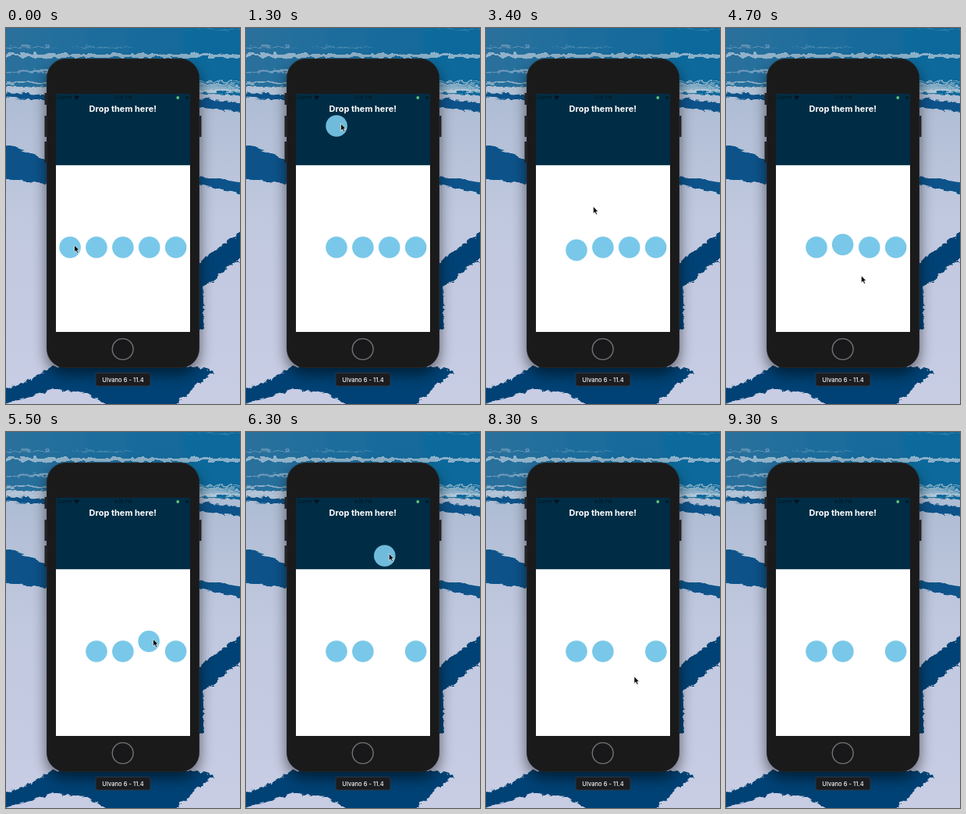
Animation, 300 px wide and 480 px high, one loop 9400 ms. Source, as an HTML page:

```html
<!DOCTYPE html>
<html lang="en">
<head>
<meta charset="utf-8">
<title>Drag and drop</title>
<style>
  html, body { margin: 0; width: 100%; height: 100%; overflow: hidden; background: #bcc5dd; }
  svg { display: block; width: 300px; height: 480px; }
  text { font-family: Inter, "Open Sans", sans-serif; }
  .status { font-size: 5.6px; fill: #02131e; }
  .title { font-size: 11px; font-weight: 700; fill: #fff; }
  .label { font-size: 7.6px; font-weight: 500; fill: #f4f4f4; }
</style>
</head>
<body>
<svg viewBox="0 0 300 480">
  <defs>
    <linearGradient id="sea">
      <stop offset="0" stop-color="#2c709d"/>
      <stop offset="1" stop-color="#08689b"/>
    </linearGradient>
    <linearGradient id="ice" x2="0" y2="1">
      <stop offset=".2" stop-color="#afbdd4"/>
      <stop offset=".5" stop-color="#c0c8df"/>
      <stop offset="1" stop-color="#c8cde4"/>
    </linearGradient>
    <filter id="rough" x="-5%" y="-5%" width="110%" height="110%">
      <feTurbulence baseFrequency=".06 .12" numOctaves="2" seed="4"/>
      <feDisplacementMap in="SourceGraphic" scale="7" xChannelSelector="R" yChannelSelector="G"/>
    </filter>
    <filter id="blur" x="-30%" y="-30%" width="160%" height="160%"><feGaussianBlur stdDeviation="9"/></filter>
  </defs>

  <rect width="300" height="480" fill="url(#ice)"/>
  <g filter="url(#rough)">
    <path d="M-9-9H309V84L-9 72Z" fill="url(#sea)"/>
    <g id="streaks" fill="#b4c8d8"></g>
    <g fill="#07528a">
      <path d="M-9 80 62 84V91L-9 87ZM240 88 309 94V106L240 99Z"/>
      <path d="M-9 146 25 156 60 172V198L-9 190Z"/>
      <path d="M240 186 309 197V212L240 196Z"/>
    </g>
    <g fill="#024274">
      <path d="M309 253 275 275 240 302V385L253 382 250 328 265 320 282 303 309 288Z"/>
      <path d="M-9 462 30 446 60 430H240L264 437 235 462 205 489H145L100 463 60 460-9 478Z"/>
    </g>
  </g>

  <rect x="52" y="48" width="196" height="394" rx="26" fill="#000" opacity=".55" filter="url(#blur)"/>
  <path d="M51 83V98M51 112V139M51 145V172M249 112V139" stroke="#202124" stroke-width="3"/>
  <rect x="52.5" y="39.5" width="195" height="394" rx="24" fill="#1a1a1b" stroke="#242527"/>
  <circle cx="149.7" cy="410" r="13.4" fill="#18181a" stroke="#737476" stroke-width="1.4"/>

  <rect x="64" y="84" width="172" height="304" fill="#fff"/>
  <rect x="64" y="84" width="172" height="91.2" fill="#002d45"/>
  <g class="status">
    <text x="66.5" y="91">Carrier</text>
    <text x="150" y="91" text-anchor="middle">4:06 PM</text>
    <path d="M87 87.6Q90.5 84.8 94 87.6L90.5 92Z"/>
    <rect x="230.5" y="87.5" width="3" height="3" rx=".8"/>
  </g>
  <circle cx="220.3" cy="89" r="1.9" fill="#5fc07a"/>
  <text class="title" x="149.7" y="106.5" text-anchor="middle">Drop them here!</text>

  <rect x="115" y="440.5" width="70" height="16.5" rx="2.5" fill="#1b1c20" stroke="#3a3c42" stroke-width=".7"/>
  <text class="label" x="150" y="451.8" text-anchor="middle">Ulvano 6 - 11.4</text>

  <g id="balls" fill="#79c8e9"></g>
  <path id="cursor" d="M0 0V9.2L2.1 7.3 3.6 10.6 5.2 9.9 3.8 6.7H6.5Z" fill="#050505" stroke="#fff" stroke-width=".7"/>
</svg>

<script>
const LOOP = 9400, STEP = 100, TRAVEL = 750, REST = 300, FADE = 1000;

// dx, dy: how far each ball is carried; hold: pointer offset from its centre
const drags = [
  { grab: 350, release: 1100, dx: 34, dy: -155, drop: true },
  { grab: 2350, release: 3040, dx: 0, dy: -93 },
  { grab: 3860, release: 4350, dx: 5, dy: 71 },
  { grab: 5350, release: 6100, dx: -6, dy: -122, drop: true },
  { grab: 7000, release: 7500, dx: -133.5, dy: -72, hold: [1, 5] }
];
const home = i => [82.1 + i * 33.9, 280];

const easeInOut = p => p < .5 ? 2 * p * p : 1 - 2 * (1 - p) ** 2;
const progress = (t, from, to) => Math.min(1, Math.max(0, (t - from) / (to - from)));
const glide = (t, from, to) => {
  const p = progress(t, from, to);
  return p * p * (3 - 2 * p);
};

// Damped spring from 1 to 0
function spring(ms) {
  const s = ms / 1000, w = 12.9;
  return Math.exp(-8 * s) * (Math.cos(w * s) + 8 / w * Math.sin(w * s));
}

function add(parent, tag, attrs) {
  const el = document.createElementNS('http://www.w3.org/2000/svg', tag);
  for (const name in attrs) el.setAttribute(name, attrs[name]);
  return document.getElementById(parent).appendChild(el);
}

// Pale ice bands on the sea, denser towards the shore
let seed = 7;
const random = () => (seed = seed * 16807 % 2147483647) / 2147483647;
add('streaks', 'rect', { x: -9, y: 31, width: 318, height: 5, opacity: .75 });
for (let i = 0; i < 28; i++) {
  const depth = Math.sqrt(random());
  add('streaks', 'ellipse', {
    cx: random() * 300, cy: depth * 82, rx: 30 + random() * 70,
    ry: .6 + depth * 2 * random(), opacity: .2 + depth * .6
  });
}

const cursor = document.getElementById('cursor');
const balls = drags.map((_, i) => {
  const [cx, cy] = home(i);
  return add('balls', 'circle', { cx, cy, r: 13.8 });
});

// Pointer legs: carry a ball, then travel to the next one
const legs = drags.flatMap(({ grab, release, dx, dy, drop, hold = [5.5, -3] }, i) => {
  const [x, y] = home(i).map((v, axis) => v + hold[axis]);
  const leave = release + (drop ? REST : 0);
  return [
    { start: grab, end: release, x, y },
    { start: leave, end: leave + TRAVEL, x: x + dx, y: y + dy }
  ];
});
legs[legs.length - 1].end = LOOP - 200;
const exit = { x: 315, y: 430 };

function pointer(t) {
  const next = legs.findIndex(leg => leg.start > t);
  const i = Math.max(0, (next < 0 ? legs.length : next) - 1);
  const from = legs[i], to = legs[i + 1] || exit;
  const k = glide(t, from.start, from.end);
  return [from.x + (to.x - from.x) * k, from.y + (to.y - from.y) * k];
}

const move = (el, x, y) => el.setAttribute('transform', `translate(${x.toFixed(2)} ${y.toFixed(2)})`);

function draw(t) {
  move(cursor, ...pointer(t));
  drags.forEach(({ grab, release, dx, dy, drop }, i) => {
    const back = drop || t < release ? 1 : spring(t - release);
    const k = glide(t, grab, release) * back;
    move(balls[i], dx * k, dy * k);
    if (drop) balls[i].setAttribute('opacity', 1 - easeInOut(progress(t, release, release + FADE)));
  });
}

const start = performance.now();
function tick() {
  const t = (performance.now() - start) % LOOP;
  draw(Math.floor(t / STEP) * STEP);
  requestAnimationFrame(tick);
}
tick();
</script>
</body>
</html>
```
